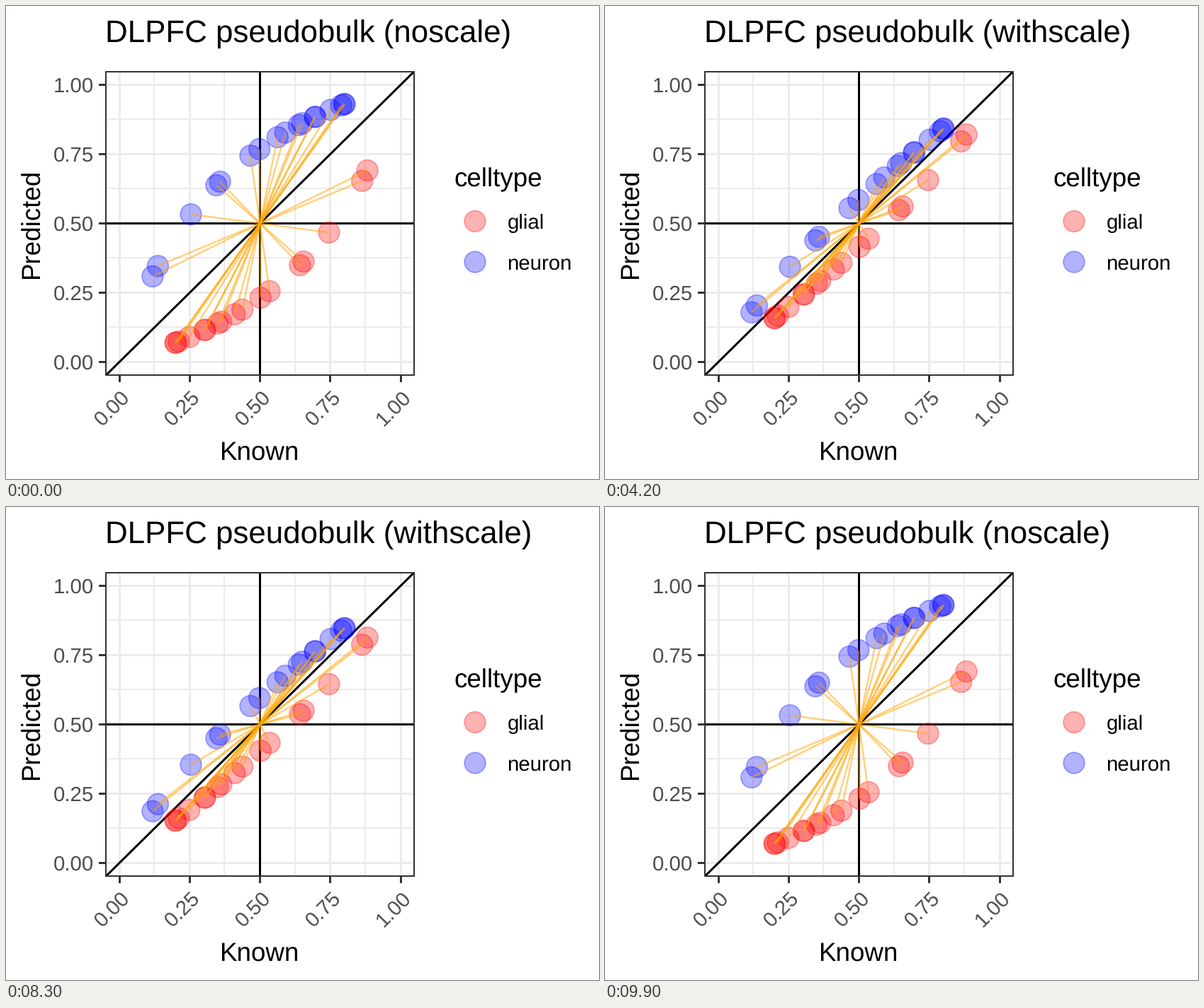
Animation of 837x669 px, one loop 10 s. Source, as a matplotlib script:

```python
import matplotlib.pyplot as plt
import numpy as np
from matplotlib.animation import FuncAnimation
from matplotlib.collections import LineCollection
from matplotlib.patches import Rectangle

W, H, DPI = 837, 669, 64
PT = 72 / DPI                      # points per pixel
FRAMES, STEP_MS, MOVE = 100, 100, 25

plt.rcParams["font.family"] = "Liberation Sans"
plt.rcParams["text.hinting"] = "none"

GRID, BORDER, TICK_TEXT = "#EBEBEB", "#333333", "#4D4D4D"
RED, BLUE, ORANGE = (1, 0, 0, 0.3), (0, 0, 1, 0.3), (1, 165 / 255, 0, 0.5)
TITLE_SIZE, TEXT_SIZE, SMALL_SIZE = 43.9, 36.7, 29.4
LINE, THIN, SPOKE, RING, RADIUS = 3, 2, 2.5, 1.86, 14.9
LEFT, RIGHT, TOP, BOTTOM = 140, 577, 92, 523


def to_x(v):
    return 358.5 + 397 * (v - 0.5)


def to_y(v):
    return 307.5 - 392 * (v - 0.5)


def mid(v):
    """Centre of the pixel that holds v."""
    return np.floor(v) + 0.5


# Known neuron shares; the unscaled prediction multiplies their odds by a bias.
BIAS = 3.34
neuron = np.array([0.118, 0.137, 0.2545, 0.345, 0.358, 0.466, 0.498, 0.5625,
                   0.590, 0.638, 0.650, 0.695, 0.697, 0.751, 0.789, 0.799,
                   0.801])
biased = BIAS * neuron / (1 + (BIAS - 1) * neuron)
known = np.concatenate([neuron, 1 - neuron])
raw = np.concatenate([biased, 1 - biased])
colors = [BLUE] * len(neuron) + [RED] * len(neuron)

fig = plt.figure(figsize=(W / DPI, H / DPI), dpi=DPI, facecolor="white")
ax = fig.add_axes([0, 0, 1, 1])
ax.set_xlim(0, W)
ax.set_ylim(H, 0)
ax.axis("off")
panel = Rectangle((LEFT, TOP), RIGHT - LEFT, BOTTOM - TOP,
                  transform=ax.transData)


def line(xs, ys, color, width, z, clip=True):
    art, = ax.plot(xs, ys, color=color, lw=width * PT, zorder=z,
                   solid_capstyle="butt", snap=False)
    if clip:
        art.set_clip_path(panel)


def text(x, y, s, size, color="black", ha="left", angle=0):
    return ax.text(x, y, s, fontsize=size * PT, color=color, ha=ha,
                   va="baseline", rotation=angle, rotation_mode="anchor")


def dots(xs, ys, cols):
    return ax.scatter(xs, ys, s=(2 * RADIUS * PT) ** 2, facecolors=cols,
                      edgecolors=cols, linewidths=RING * PT, zorder=4)


# Panel grid, ticks and labels
for v in np.arange(0.125, 1, 0.25):
    x, y = np.floor(to_x(v)), np.floor(to_y(v))
    line([x, x], [TOP, BOTTOM], GRID, THIN, 1)
    line([LEFT, RIGHT], [y, y], GRID, THIN, 1)
for v in np.linspace(0, 1, 5):
    x, y = mid(to_x(v)), mid(to_y(v))
    line([x, x], [TOP, BOTTOM], GRID, LINE, 2)
    line([LEFT, RIGHT], [y, y], GRID, LINE, 2)
    line([x, x], [BOTTOM - 1, BOTTOM + 9], BORDER, LINE, 2, clip=False)
    line([LEFT - 9, LEFT + 1], [y, y], BORDER, LINE, 2, clip=False)
    text(123.9, y + 10.5, f"{v:.2f}", SMALL_SIZE, TICK_TEXT, "right")
    text(to_x(v) + 16.2, 554.8, f"{v:.2f}", SMALL_SIZE, TICK_TEXT, "right", 45)

# Reference lines and border
line([to_x(0.5)] * 2, [TOP, BOTTOM], "black", LINE, 3)
line([LEFT, RIGHT], [to_y(0.5)] * 2, "black", LINE, 3)
line(to_x(np.array([-0.1, 1.1])), to_y(np.array([-0.1, 1.1])),
     "black", LINE, 3)
ax.add_patch(Rectangle((LEFT + 1, TOP + 1), RIGHT - LEFT - 2,
                       BOTTOM - TOP - 2, fill=False, ec=BORDER,
                       lw=THIN * PT, zorder=6, snap=False))

# Titles and legend
title = text(140.2, 52, "", TITLE_SIZE)
text(358.5, 641.5, "Known", TEXT_SIZE, ha="center")
text(47, 307.5, "Predicted", TEXT_SIZE, ha="center", angle=90)
text(632, 255.5, "celltype", TEXT_SIZE)
dots([662, 662], [304.5, 362], [RED, BLUE])
text(707.5, 315, "glial", SMALL_SIZE)
text(707.5, 372.5, "neuron", SMALL_SIZE)

# Moving parts
points = dots(to_x(known), to_y(raw), colors)
spokes = LineCollection([], colors=[ORANGE], linewidths=SPOKE * PT, zorder=5,
                        capstyle="butt", snap=False)
ax.add_collection(spokes, autolim=False)


def progress(i):
    """0 = unscaled, 1 = scaled; hold, move, hold, move back."""
    there = np.clip((i - MOVE) / MOVE, 0, 1)
    back = np.clip((i - 3 * MOVE + 1) / MOVE, 0, 1)
    return there - back


def update(i):
    p = progress(i)
    xs, ys = to_x(known), to_y(raw + (known - raw) * p)
    ends = np.column_stack([xs, ys])
    hub = (to_x(0.5), to_y(0.5))
    points.set_offsets(ends)
    spokes.set_segments([[hub, end] for end in ends])
    mode = "withscale" if p > 0.5 else "noscale"
    title.set_text(f"DLPFC pseudobulk ({mode})")
    return points, spokes, title


anim = FuncAnimation(fig, update, frames=FRAMES, interval=STEP_MS,
                     init_func=lambda: update(0), repeat=True, repeat_delay=0)
plt.show()
```
